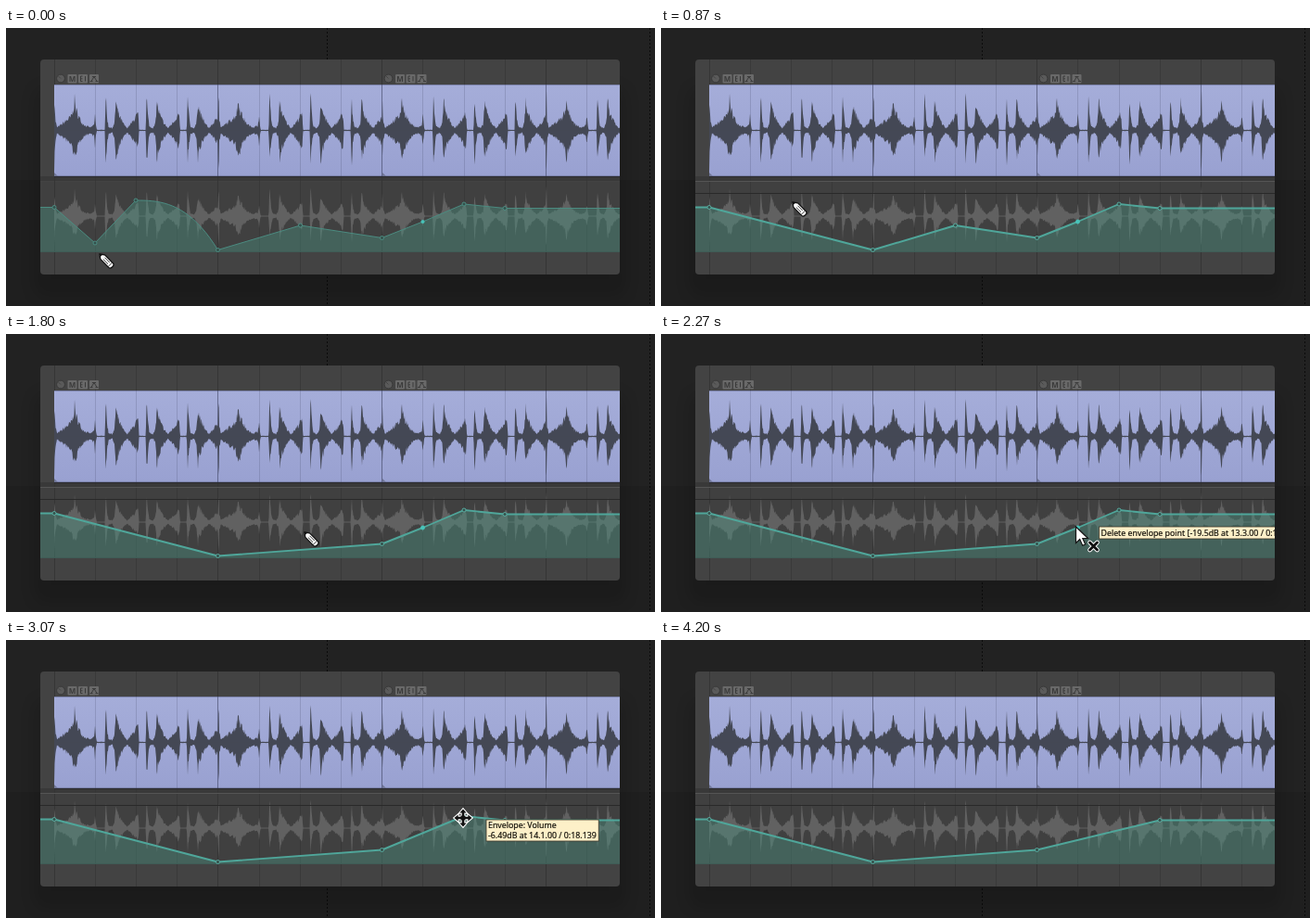
Animation, 700 px wide and 300 px high, one loop 4470 ms. Source, as an HTML page:

```html
<!DOCTYPE html>
<html lang="en">
<head>
<meta charset="utf-8">
<title>Volume envelope editing</title>
<style>
  html, body { margin: 0; width: 100%; height: 100%; overflow: hidden; background: #212121; }
  svg { display: block; width: 700px; height: 300px; }
  text { font-family: "Noto Sans", "Open Sans", sans-serif; }
  #tip text { font-size: 8.8px; font-weight: 500; fill: #15130c; stroke: #15130c; stroke-width: .2; }
  .button text { font-size: 8px; font-weight: 600; fill: #3b3b3b; text-anchor: middle; }
</style>
</head>
<body>
<svg viewBox="0 0 700 300">
  <defs>
    <linearGradient id="clipFill" x1="0" y1="0" x2="0" y2="1">
      <stop offset="0" stop-color="#a5add9"/>
      <stop offset="1" stop-color="#99a1d1"/>
    </linearGradient>
    <filter id="blur" x="-10%" y="-20%" width="120%" height="140%"><feGaussianBlur stdDeviation="8"/></filter>
    <clipPath id="panelClip"><rect x="37" y="34" width="625" height="232" rx="4"/></clipPath>
    <clipPath id="laneClip"><rect x="37" y="166" width="625" height="75.5"/></clipPath>
  </defs>

  <rect width="700" height="300" fill="#222"/>
  <rect y="164" width="700" height="136" fill="#1f1f1f"/>
  <path d="M346.5 0V300M694.5 0V300" stroke="#0b0b0b" stroke-dasharray="2 2"/>
  <rect x="30" y="64" width="639" height="226" rx="12" fill="#000" opacity=".13" filter="url(#blur)"/>

  <g clip-path="url(#panelClip)">
    <rect x="37" y="34" width="625" height="232" fill="#434343"/>
    <rect x="37" y="160" width="625" height="5" fill="#393939"/>
    <rect x="37" y="166" width="625" height="75" fill="#404040"/>
    <g id="grid" stroke="#353535"></g>
    <rect x="52" y="61" width="610" height="99" fill="url(#clipFill)"/>
    <path d="M52 61.5H662M52 159.5H662" stroke="#7d84ad"/>
    <g id="clipGrid" stroke="#3d4260"></g>
    <path id="wave" fill="#444855"/>
    <path d="M52 110.5H662" stroke="#444855" stroke-width=".8"/>
    <path d="M52 156l4 4h-4zM406 156l4 4h-4z" fill="#6f7596"/>
    <path d="M52 160.5H662" stroke="#2b2b30"/>
    <g clip-path="url(#laneClip)"><path id="laneWave" fill="#616161"/></g>
    <g id="laneTop"><path d="M37 165.5H662" stroke="#555"/><path d="M37 178.5H662" stroke="#292929"/></g>
    <path id="area" fill="#4a9482" fill-opacity=".4"/>
    <path d="M37 241.5H662" stroke="#3f5c56"/>
    <path id="line" fill="none" stroke-linejoin="round"/>
    <g id="dots"></g>
    <g id="buttons"></g>
    <g id="tip">
      <rect fill="#fdf0c8" stroke="#3a3427" stroke-width=".8"/>
      <text></text><text></text>
    </g>
  </g>
  <g id="cursor"></g>
</svg>

<script>
const NS = "http://www.w3.org/2000/svg";
const $ = id => document.getElementById(id);
const set = (node, attrs) => { for (const a in attrs) node.setAttribute(a, attrs[a]); return node; };
const add = (parent, tag, attrs = {}) => parent.appendChild(set(document.createElementNS(NS, tag), attrs));

const LOOP = 4470, STEP = 1000 / 15;
const LEFT = 52, RIGHT = 662, BEAT = 44.2, BAR = BEAT * 4, FLOOR = 241;

// grid
for (let i = 0; LEFT + i * BEAT < RIGHT; i++) {
  const x = Math.floor(LEFT + i * BEAT) + .5, strong = i % 4 === 0;
  add($("grid"), "path", { d: `M${x} 34V266`, opacity: strong ? 1 : .65 });
  if (i) add($("clipGrid"), "path", { d: `M${x} 61V160`, opacity: strong ? .6 : .2 });
}

// drum loop outline: one swell, then three equal hits per bar
const SWELL = [[0, 46], [1.2, 14], [3, 4], [8, 8], [13, 13], [18, 18], [20, 24], [22, 40], [23.5, 27], [27, 17],
  [30, 10], [34, 6], [39, 4], [43, 7], [44, 20], [45.2, 5], [46, .8]];
const HIT = [[-1, .8], [0, 45], [1.3, 20], [3, 5], [7, 3], [9.5, 9], [11, 39], [12.5, 27], [15, 18],
  [19, 9], [23, 3], [26, 7], [30, 13], [34, 21], [35.2, 20], [36, .8]];
const SHAPE = SWELL.concat(...[0, 1, 2].map(i => HIT.map(([x, a]) => [x + 55.5 + i * BEAT, a])));

function level(x) {
  const j = SHAPE.findIndex(p => p[0] > x);
  if (j < 1) return 1;
  const [x0, a0] = SHAPE[j - 1], [x1, a1] = SHAPE[j];
  return a0 + (a1 - a0) * (x - x0) / (x1 - x0);
}

function wavePath(mid, scale) {
  let seed = 7;
  const rand = () => (seed = seed * 16807 % 2147483647) / 2147483647;
  const top = [], bottom = [];
  for (let x = LEFT; x <= RIGHT; x += .5) {
    const pos = x - LEFT, bar = Math.floor(pos / BAR), at = pos - bar * BAR;
    const a = (bar % 2 && at < 1 ? 48 : level(at)) * scale;
    top.push(`${x} ${(mid - a * (.6 + .4 * rand())).toFixed(1)}`);
    bottom.unshift(`${x} ${(mid + a * (.6 + .4 * rand())).toFixed(1)}`);
  }
  return "M" + top.concat(bottom).join("L") + "Z";
}
set($("wave"), { d: wavePath(110.5, 1) });
set($("laneWave"), { d: wavePath(203, .75) });

// item buttons
for (const x of [59, 412.5]) {
  const g = add($("buttons"), "g", { class: "button", transform: `translate(${x} 54.5)` });
  add(g, "circle", { r: 4.4, fill: "#5a5a5a", stroke: "#383838" });
  add(g, "path", { d: "M0 0L-2.5 -2.5", stroke: "#444" });
  for (const dx of [7.5, 19, 31]) add(g, "rect", { x: dx, y: -4.5, width: 10, height: 9.5, rx: 1, fill: "#696969" });
  add(g, "text", { x: 12.5, y: 3.2 }).textContent = "M";
  add(g, "path", { d: "M21.5 -2.5V3M21.5 -2.5h2M21.5 .3h2M21.5 3h2M26.5 -2.5V3M33 3l3-5 3 5M34.5 3h-3M37.5 3h3M34 -2h4", fill: "none", stroke: "#3b3b3b" });
}

// envelope points; `gone` is the step at which a point is deleted
const POINTS = [
  { x: 52, y: 193.5 }, { x: 96, y: 232, gone: 6 }, { x: 140, y: 186, gone: 12, curved: true },
  { x: 228.5, y: 239.5 }, { x: 317.5, y: 213, gone: 25 }, { x: 405.5, y: 226.5 },
  { x: 449.5, y: 209, gone: 36, bright: 0 }, { x: 494, y: 190, gone: 59, bright: 47, drag: true },
  { x: 538, y: 194.5 }
];

// cursor path: step, x, y, kind
const PATH = [
  [0, 101, 244, "pencil"], [2, 98, 234, "remove"], [4, 96, 232, "remove"], [6, 96, 233, "pencil"],
  [8, 98, 232, "pencil"], [10, 140, 187, "remove"], [12, 141, 187, "pencil"], [13, 142, 188, "pencil"],
  [14, 150, 192, "pencil"], [16, 229, 213, "pencil"], [19, 308, 218, "pencil"], [21, 316.5, 219, "pencil"],
  [22, 316, 213, "remove"], [25, 316, 213, "pencil"], [27, 322, 214, "pencil"], [31, 444, 210, "pencil"],
  [32, 447, 208, "remove"], [36, 448, 208, "pencil"], [38, 453, 206, "pencil"], [40, 486, 195, "arrow"],
  [41, 492, 197, "move"], [44, 493, 192, "move"], [47, 493, 192, "move"], [52, 494, 201, "move"],
  [53, 495, 205, "arrow"], [55, 495, 205, "arrow"], [57, 494, 200, "remove"], [59, 494, 201, "arrow"],
  [62, 506, 240, "arrow"], [63, 506, 240, ""]
];

const TIPS = [
  [2, 6, "-51.0dB at 9.3.00 / 0:11.860"], [10, 12, "-4.85dB at 10.1.00 / 0:12.558"],
  [22, 25, "-22.9dB at 12.1.00 / 0:15.349"], [32, 36, "-19.5dB at 13.3.00 / 0:17.442"],
  [57, 59, "-12.6dB at 14.1.00 / 0:18.139"]
];

const arrow = (fill, edge) =>
  `<path d="M0 0V17.5L4.2 13.6 7.2 20.3 10.2 19 7.3 12.5H13Z" fill="${fill}" stroke="${edge}" stroke-width="1.2"/>`;
const cross = "M15 17l8 8M23 17l-8 8";
const arms = "M0 -9.5L3.6 -5.4H1.3V-1.3H5.4V-3.6L9.5 0 5.4 3.6V1.3H1.3V5.4H3.6L0 9.5-3.6 5.4H-1.3V1.3H-5.4V3.6L-9.5 0-5.4 -3.6V-1.3H-1.3V-5.4H-3.6Z";
const CURSORS = {
  "": "",
  arrow: arrow("#1c1c1c", "#c4c4c4"),
  remove: arrow("#fff", "#151515") + `<path d="${cross}" stroke="#fff" stroke-width="4.6" stroke-linecap="round"/>
    <path d="${cross}" stroke="#111" stroke-width="2.8" stroke-linecap="round"/>`,
  move: `<path d="${arms}" fill="#111" stroke="#fff" stroke-width="2.2" paint-order="stroke"/>
    <circle r="2.8" fill="#111"/>`,
  pencil: `<g transform="rotate(45)"><path d="M0 0L4.5 -3.3H17Q19.5 -3.3 19.5 0T17 3.3H4.5Z" fill="#fff" stroke="#111" stroke-width="1.3"/>
    <path d="M0 0L2.6 -1.6V1.6Z" fill="#111"/><path d="M6.5 -1.2H14M6.5 1.2H14M16 -3V3" stroke="#222" stroke-width=".9"/></g>`
};

const clamp = v => Math.min(1, Math.max(0, v));
const ease = v => v * v * (3 - 2 * v);

function drawEnvelope(step, dragY) {
  const active = step >= 2;
  const live = POINTS.filter(p => !(step >= p.gone)).map(p => p.drag ? { ...p, y: dragY } : p);
  let d = `M37 ${live[0].y}`;
  live.forEach((p, i) => {
    const from = live[i - 1];
    if (from && from.curved)
      for (let t = .05; t < 1; t += .05)
        d += `L${from.x + (p.x - from.x) * t} ${from.y + (p.y - from.y) * t ** 2.7}`;
    d += `L${p.x} ${p.y}`;
  });
  d += `H${RIGHT}`;
  set($("line"), { d, stroke: active ? "#4fa69a" : "#4b8b80", "stroke-width": active ? 1.9 : 1 });
  set($("area"), { d: `${d}V${FLOOR}H37Z` });
  set($("laneTop"), { opacity: active ? 1 : 0 });
  $("dots").replaceChildren();
  for (const p of live) {
    const bright = step >= p.bright;
    add($("dots"), "circle", {
      cx: p.x, cy: p.y, r: bright && !active ? 1.6 : 2, fill: bright ? "#48c4ba" : "#34504b",
      stroke: bright ? "#48c4ba" : active ? "#5cb0a4" : "#4f9186", "stroke-width": .9
    });
  }
}

function drawTip(step, x, y, dragY) {
  const hit = TIPS.find(([a, b]) => step >= a && step < b);
  const moving = step >= 42 && step < 53;
  set($("tip"), { visibility: hit || moving ? "visible" : "hidden" });
  const [box, first, second] = $("tip").children;
  const db = (6.49 + (dragY - 190) * .68).toFixed(dragY > 195 ? 1 : 2);
  first.textContent = hit ? `Delete envelope point [${hit[2]}]` : moving ? "Envelope: Volume" : "";
  second.textContent = moving ? `-${db}dB at 14.1.00 / 0:18.139` : "";
  if (!hit && !moving) return;
  const left = x + 25, top = moving ? y + 2 : y;
  const wide = Math.max(first.getComputedTextLength(), second.getComputedTextLength());
  set(box, { x: left, y: top, width: wide + 4.5, height: moving ? 23 : 13 });
  set(first, { x: left + 2, y: top + (moving ? 9 : 9.6) });
  set(second, { x: left + 2, y: top + 19.8 });
}

function draw(step) {
  const dragY = 190 + 9 * ease(clamp((step - 47) / 5));
  const i = PATH.findLastIndex(p => p[0] <= step);
  const [k0, x0, y0, kind] = PATH[i], [k1, x1, y1] = PATH[i + 1] || [k0 + 1, x0, y0];
  const v = ease((step - k0) / (k1 - k0));
  const x = x0 + (x1 - x0) * v, y = y0 + (y1 - y0) * v;
  drawEnvelope(step, dragY);
  drawTip(step, x, y, dragY);
  set($("cursor"), { transform: `translate(${x} ${y})` }).innerHTML = CURSORS[kind];
}

const start = performance.now();
let shown = -1;
function tick() {
  const t = (performance.now() - start) % LOOP;
  const step = Math.min(66, Math.floor((t + 3.4) / STEP));
  if (step !== shown) draw(shown = step);
  requestAnimationFrame(tick);
}
tick();
</script>
</body>
</html>
```
